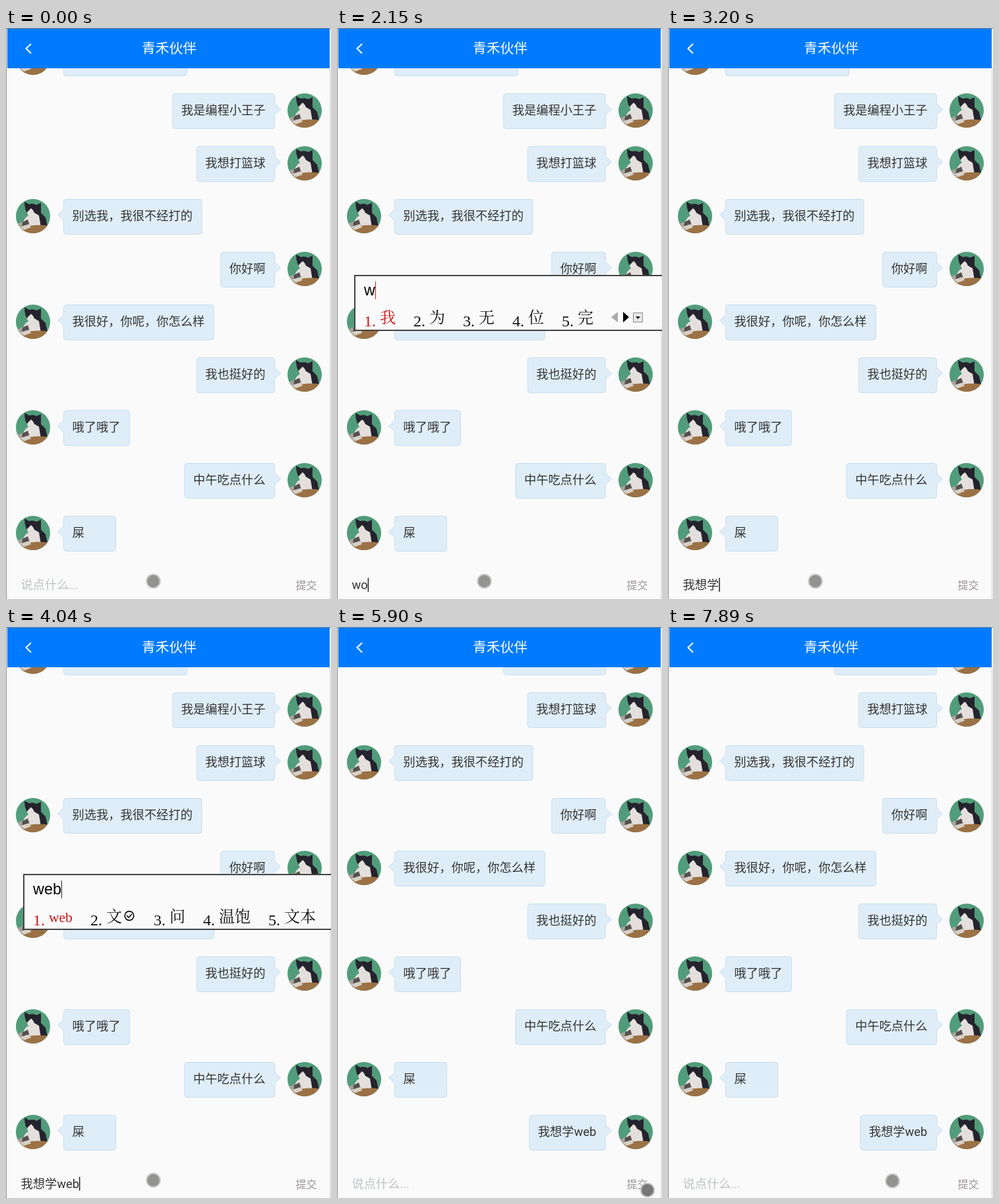
An HTML page for the animation above (8000 ms loop, 493 px wide and 865 px high).

```html
<!DOCTYPE html>
<html lang="zh-CN">
<head>
<meta charset="utf-8">
<title>Chat</title>
<style>
html, body { margin: 0; height: 100%; overflow: hidden; background: #fafafa; }
svg { display: block; width: 100vw; height: 100vh; }
text { font-family: Roboto, "Noto Sans CJK SC", "Noto Sans CJK JP", sans-serif; font-size: 18.25px; fill: #333; }
.bubble { fill: #dfedf8; stroke: #c4deee; }
.title { font-size: 20.8px; fill: #fff; }
.hint { fill: #bfc3c6; }
.send { font-size: 16px; fill: #9c9494; }
.pinyin { font: 23.4px "Liberation Sans", Arial, sans-serif; fill: #000; }
.pick { font-family: "Liberation Serif", "Noto Serif CJK SC", "Noto Sans CJK SC", "Noto Sans CJK JP", serif; font-size: 24px; fill: #111; }
.latin { font-size: 21.5px; }
.red { fill: #c81414; }
</style>
</head>
<body>
<svg viewBox="0 0 493 865">
  <defs>
    <clipPath id="round"><circle cx="26" cy="26" r="26"/></clipPath>
    <g id="cat" clip-path="url(#round)">
      <path fill="#519c7a" d="M0 0H52V52H0Z"/>
      <path fill="#a9a49a" d="M0 38L14 33L18 52H0Z"/>
      <path fill="#25232d" d="M13 4L20 8Q27 6 31 9L38 6L38 21L45 28L48 42L32 42L20 24Q13 19 13 4Z"/>
      <path fill="#e4dfdc" d="M23 14Q27 17 28 21L35 25L38 43H10Q10 30 19 25Q15 21 19 18Z"/>
      <path fill="#55504f" d="M10 35L18 31L21 40L9 45Z"/>
      <path fill="#9b7145" d="M10 44Q28 37 52 41V52H8Z"/>
      <path fill="#d8d0c7" d="M7 42L20 38L23 43L12 47Z"/>
    </g>
  </defs>
  <rect width="493" height="865" fill="#fafafa"/>
  <g id="list"></g>
  <rect width="493" height="61" fill="#fafafa"/>
  <rect x="2" y="1" width="489" height="60" fill="#007bff"/>
  <path d="M38 24L30.500 31L38 38.500" fill="none" stroke="#fff" stroke-width="2"/>
  <text class="title" x="247.500" y="38" text-anchor="middle">青禾伙伴</text>
  <path d="M0 .5H493M.5 0V865" stroke="#858585"/>
  <path d="M491.500 61V865" stroke="#d0d0d0"/>
  <text class="send" x="439.500" y="850">提交</text>
  <g id="live"></g>
</svg>
<script>
const LOOP = 8000, SENT = 5900;
const $ = id => document.getElementById(id);
const textWidth = (s, wide, narrow) =>
  [...s].reduce((w, c) => w + (c < '\u0100' ? narrow : wide), 0);

// [is mine, text, fixed width]
const messages = [
  [0, '', 188], [1, '我是编程小王子'], [1, '我想打篮球'], [0, '别选我，我很不经打的'],
  [1, '你好啊'], [0, '我很好，你呢，你怎么样'], [1, '我也挺好的'],
  [0, '哦了哦了'], [1, '中午吃点什么'], [0, '屎'], [1, '我想学web']
];

function row([mine, text, fixed], i) {
  const y = 19 + 80 * i;
  const w = fixed || Math.max(80, textWidth(text, 18.25, 11.3) + 28);
  const x = mine ? 408 - w : 87;
  const [base, tip] = mine ? [407, 416.5] : [88, 78.5];
  return `<use href="#cat" x="${mine ? 427 : 15}" y="${y}"/>
    <rect class="bubble" x="${x + .5}" y="${y + .5}" width="${w - 1}" height="53" rx="4"/>
    <path class="bubble" d="M${base} ${y + 15}L${tip} ${y + 24}L${base} ${y + 33}"/>
    <text x="${x + 13.5}" y="${y + 31.5}">${text}</text>`;
}

// [start, input text, pinyin, candidates]; an empty input shows the hint
const typing = [
  [0, ''],
  [2150, 'wo', 'w', '我 为 无 位 完'],
  [2270, 'wox', 'wo', '我 握 窝 卧 沃'],
  [2390, 'woxi', 'wox', '我想 我先 我 窝'],
  [2530, 'woxian', 'woxia', '我下 我想 我 窝'],
  [2650, 'woxiang', 'woxian', '我先 我想 我 窝'],
  [2780, 'woxiangx', 'woxiang', '我想 我像 我 窝'],
  [2900, 'woxiangxu', 'woxiangx', '我想学 我想 我 握'],
  [3050, 'woxiangxue', 'woxiangxue', '我想学 我想 我 窝'],
  [3200, '我想学'],
  [3790, '我想学we', 'we', '为 文 问 位 未'],
  [4040, '我想学web', 'web', 'web 文✓ 问 温饱 文本'],
  [4190, '我想学web'],
  [SENT, '']
];

const caret = [[0, 0], [400, 1], [930, 0], [1470, 1], [1900, 0], [2150, 1],
  [4620, 0], [5050, 1], [5500, 0]];

// [start, x, y, pressed]
const pointer = [
  [0, 223.5, 838], [5050, 378, 860], [5200, 378, 900], [5500, 472, 853],
  [5620, 471, 853, 1], [6270, 440, 841], [6950, 380, 730], [7080, 272, 544],
  [7220, 312, 650], [7340, 345, 770], [7470, 359, 831], [7590, 347, 825],
  [7740, 345, 824], [7890, 340.5, 839]
];

const now = (list, t) => list.findLast(e => e[0] <= t);

function popup(pinyin, words) {
  let x = 41;
  let out = `<rect x="27" y="375" width="480" height="83" fill="#fafafa" stroke="#444" stroke-width="2"/>
    <text class="pinyin" x="41" y="405">${pinyin}</text>`;
  const end = 41.5 + measure(pinyin, 'pinyin');
  out += `<path d="M${end} 384V411" stroke="${pinyin === 'w' ? '#c81414' : '#222'}"/>`;
  words.split(' ').forEach((word, i) => {
    const tick = word.endsWith('✓'), label = word.replace('✓', '');
    const w = textWidth(label, 24, 12) + (tick ? 21 : 0);
    const red = i ? '' : ' red';
    out += `<text class="pick${red}" x="${x}" y="452">${i + 1}.</text>
      <text class="pick${red}${label < '\u0100' ? ' latin' : ''}" x="${x + 24}" y="447">${label}</text>`;
    if (tick) {
      const cx = x + 59;
      out += `<g fill="none" stroke="#111" stroke-width="1.700"><circle cx="${cx}" cy="437.500" r="6.800"/>
        <path d="M${cx - 4} 437l3 3l5 -5"/></g>`;
    }
    x += w + 51;
  });
  return out + `<path d="M${x + 10} 430v16l-10 -8Z" fill="#aaa"/>
    <path d="M${x + 18} 430v16l9 -8Z" fill="#000"/>
    <rect x="${x + 33.5}" y="431.500" width="14" height="14" fill="#e9e9e9" stroke="#888"/>
    <path d="M${x + 37} 437h7l-3.500 4Z" fill="#111"/>`;
}

const pen = document.createElement('canvas').getContext('2d');
function measure(s, kind) {
  pen.font = kind === 'pinyin' ? '23.4px "Liberation Sans", Arial, sans-serif'
    : '18.25px Roboto, "Noto Sans CJK SC", "Noto Sans CJK JP", sans-serif';
  return pen.measureText(s).width;
}

function live(t) {
  const [, input, pinyin, words] = now(typing, t);
  const [, x, y, pressed] = now(pointer, t);
  let out = `<text class="${input ? '' : 'hint'}" x="22.500" y="850">${input || '说点什么...'}</text>`;
  if (now(caret, t)[1]) {
    out += `<rect x="${22.5 + measure(input)}" y="833" width="1.500" height="21" fill="#222"/>`;
  }
  if (pinyin) out += popup(pinyin, words);
  return out + `<circle cx="${x}" cy="${y}" r="11.300" fill="#c3c3c1" opacity=".9"/>
    <circle cx="${x}" cy="${y}" r="9.200" fill="${pressed ? '#777' : '#929290'}"/>`;
}

let shown, sent;
function frame(ms) {
  const t = ms % LOOP, after = t >= SENT;
  if (after !== sent) {
    sent = after;
    $('list').innerHTML = messages.slice(0, after ? 11 : 10).map(row).join('');
    $('list').setAttribute('transform', `translate(0 ${after ? -80 : 0})`);
  }
  const html = live(t);
  if (html !== shown) $('live').innerHTML = shown = html;
  requestAnimationFrame(frame);
}
const start = performance.now();
const tick = () => frame(performance.now() - start);
window.requestAnimationFrame = (raf => () => raf.call(window, tick))(window.requestAnimationFrame);
tick();
</script>
</body>
</html>
```
